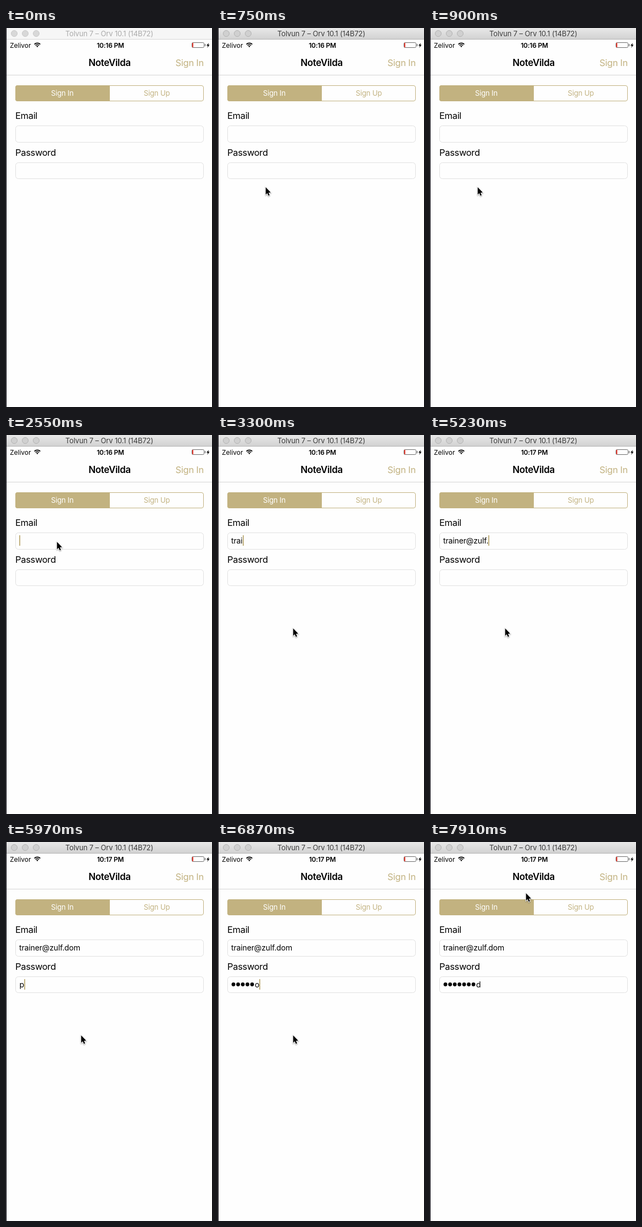
Write an HTML page with a canvas that moves like this. It is 375 by 688 pixels and loops after 8000 ms.

```html
<!DOCTYPE html>
<html lang="en">
<head>
<meta charset="utf-8">
<title>Sign in</title>
<style>
html, body { margin: 0; width: 100%; height: 100%; overflow: hidden; background: #fefefe; }
canvas { display: block; width: 375px; height: 688px; }
</style>
</head>
<body>
<canvas id="stage" width="375" height="688"></canvas>
<script>
const ctx = document.getElementById('stage').getContext('2d');
const LOOP = 8000;
const SAND = '#c2b280';
const LINE = '#e1e1e1';
const EMAIL = 'trainer@zulf.dom';
const PASSWORD = 'password';
const DOT_PITCH = 8.5;

// The screen refreshes in discrete ticks, so motion advances in even steps.
const TICK = 146;

function progress(time, start, steps) {
  const done = Math.floor((time - start) / TICK) + 1;
  return Math.min(Math.max(done / steps, 0), 1);
}

// Each burst types on until `end` characters are present.
const typing = {
  email: [
    { start: 3000, steps: 3, end: 4 },
    { start: 3900, steps: 4, end: 8 },
    { start: 4790, steps: 6, end: 16 }
  ],
  password: [
    { start: 5970, steps: 1, end: 1 },
    { start: 6270, steps: 1, end: 3 },
    { start: 6570, steps: 4, end: 8 }
  ]
};

// Each move leads in a straight line from the previous stop.
const moves = [
  { start: 150, steps: 2, x: 67, y: 274 },
  { start: 600, steps: 2, x: 86, y: 288 },
  { start: 2100, steps: 3, x: 92, y: 193 },
  { start: 2700, steps: 1, x: 201, y: 33 },
  { start: 2850, steps: 2, x: 136, y: 350 },
  { start: 7620, steps: 2, x: 174, y: 92 }
];

function typedCount(bursts, time) {
  return bursts.reduce((count, { start, steps, end }) =>
    Math.floor(count + (end - count) * progress(time, start, steps)), 0);
}

function pointerAt(time) {
  return moves.reduce((from, { start, steps, x, y }) => {
    const p = progress(time, start, steps);
    return { x: from.x + (x - from.x) * p, y: from.y + (y - from.y) * p };
  }, { x: -27, y: 264 });
}

function focusAt(time) {
  if (time < 2400 || time >= 7620) return '';
  return time < 5820 ? 'email' : 'password';
}

function label(text, x, y, { size = 14, weight = 400, tracking = -0.01, color = '#000', align = 'left' } = {}) {
  ctx.font = `${weight} ${size}px Inter, "Open Sans", sans-serif`;
  ctx.letterSpacing = `${size * tracking}px`;
  ctx.fillStyle = color;
  ctx.textAlign = align;
  ctx.fillText(text, x, y);
  return ctx.measureText(text).width;
}

function rect(x, y, w, h, color) {
  ctx.fillStyle = color;
  ctx.fillRect(x, y, w, h);
}

function roundBox(x, y, w, h, radius, stroke) {
  ctx.beginPath();
  ctx.roundRect(x + 0.5, y + 0.5, w - 1, h - 1, radius);
  ctx.strokeStyle = stroke;
  ctx.lineWidth = 1;
  ctx.stroke();
}

function dot(x, y, radius, fill) {
  ctx.beginPath();
  ctx.arc(x, y, radius, 0, Math.PI * 2);
  ctx.fillStyle = fill;
  ctx.fill();
}

function polygon(points, x, y) {
  ctx.beginPath();
  for (const [px, py] of points) ctx.lineTo(x + px, y + py);
  ctx.closePath();
}

function drawTitleBar(active) {
  const shade = ctx.createLinearGradient(0, 0, 0, 20);
  shade.addColorStop(0, active ? '#e8e8e8' : '#f6f6f6');
  shade.addColorStop(1, active ? '#d2d2d2' : '#f6f6f6');
  rect(1, 0, 374, 20, shade);
  rect(1, 20, 374, 1, active ? '#b4b4b4' : '#d6d6d6');
  for (let x = 15; x <= 55; x += 20) {
    dot(x, 10, 5.5, active ? '#d0d0d0' : '#d8d8d8');
    ctx.strokeStyle = active ? '#b3b3b3' : '#c8c8c8';
    ctx.lineWidth = 1;
    ctx.stroke();
  }
  label('Tolvun 7 – Orv 10.1 (14B72)', 188, 15,
    { size: 13, color: active ? '#3c3c3c' : '#ababab', align: 'center' });
}

function drawWifi(x, y) {
  const fan = radius => ctx.arc(x, y, radius, -Math.PI * 0.75, -Math.PI * 0.25);
  ctx.strokeStyle = ctx.fillStyle = '#000';
  ctx.lineWidth = 1.7;
  for (const radius of [4.6, 7.6]) {
    ctx.beginPath();
    fan(radius);
    ctx.stroke();
  }
  ctx.beginPath();
  ctx.moveTo(x, y);
  fan(2.6);
  ctx.fill();
}

function drawBattery() {
  roundBox(338, 26, 23, 10, 2, '#6b6b6b');
  rect(339, 27, 2, 8, '#ee4035');
  rect(362, 29, 1, 4, '#444');
  polygon([[4, 0], [0, 5], [2.4, 5], [1.4, 9], [5.6, 3.6], [3.2, 3.6]], 365, 27);
  ctx.fillStyle = '#000';
  ctx.fill();
}

function drawStatusBar(time) {
  label('Zelivor', 7, 35.5, { size: 12, tracking: 0 });
  drawWifi(57, 35);
  label(time < 3900 ? '10:16 PM' : '10:17 PM', 190, 35.5,
    { size: 12, weight: 600, align: 'center', tracking: -0.02 });
  drawBattery();
}

function drawForm() {
  label('NoteVilda', 188.5, 69, { size: 17, weight: 600, tracking: -0.02, align: 'center' });
  label('Sign In', 360, 69, { size: 16.5, tracking: -0.015, color: SAND, align: 'right' });
  rect(1, 85, 374, 1, '#d5d5d5');

  roundBox(17, 104, 343, 29, 3.5, SAND);
  ctx.beginPath();
  ctx.roundRect(17, 104, 172, 29, [4, 0, 0, 4]);
  ctx.fillStyle = SAND;
  ctx.fill();
  label('Sign In', 102.5, 123, { size: 13, color: '#fff', align: 'center' });
  label('Sign Up', 274.5, 123, { size: 13, color: SAND, align: 'center' });

  label('Email', 17, 165, { size: 16.5, tracking: -0.02 });
  label('Password', 17, 231.5, { size: 16.5, tracking: -0.02 });
  roundBox(17, 177, 343, 31, 5, LINE);
  roundBox(17, 244, 343, 30, 5, LINE);
}

function drawCaret(x, y) {
  rect(Math.round(x), y, 2, 19, SAND);
}

function drawEntries(time) {
  const focus = focusAt(time);
  const email = EMAIL.slice(0, typedCount(typing.email, time));
  const emailWidth = label(email, 24, 197);
  if (focus === 'email') drawCaret(24 + emailWidth, 182);

  // Only the newest password character stays readable.
  const count = typedCount(typing.password, time);
  const hidden = Math.max(0, count - 1);
  const lastX = 24.5 + hidden * DOT_PITCH;
  for (let i = 0; i < hidden; i++) dot(28.1 + i * DOT_PITCH, 258.5, 3.4, '#000');
  const lastWidth = label(PASSWORD.slice(hidden, count), lastX, 263.5);
  if (focus === 'password') drawCaret(lastX + lastWidth, 249);
}

function drawPointer({ x, y }) {
  polygon([[0.8, 1], [0.8, 14.5], [3.7, 11.8], [5.8, 16.6], [8, 15.6], [6, 10.9], [10, 10.6]], x, y);
  ctx.save();
  ctx.shadowColor = 'rgba(0, 0, 0, 0.4)';
  ctx.shadowBlur = 2;
  ctx.shadowOffsetY = 1;
  ctx.strokeStyle = '#fff';
  ctx.lineWidth = 1.8;
  ctx.stroke();
  ctx.restore();
  ctx.fillStyle = '#000';
  ctx.fill();
}

function draw(time) {
  rect(0, 0, 375, 688, '#fefefe');
  drawTitleBar(time >= 750);
  drawStatusBar(time);
  drawForm();
  drawEntries(time);
  rect(0, 0, 1, 688, '#08060f');
  drawPointer(pointerAt(time));
}

const begin = performance.now();
function tick() {
  draw((performance.now() - begin) % LOOP);
  requestAnimationFrame(tick);
}
tick();
</script>
</body>
</html>
```
